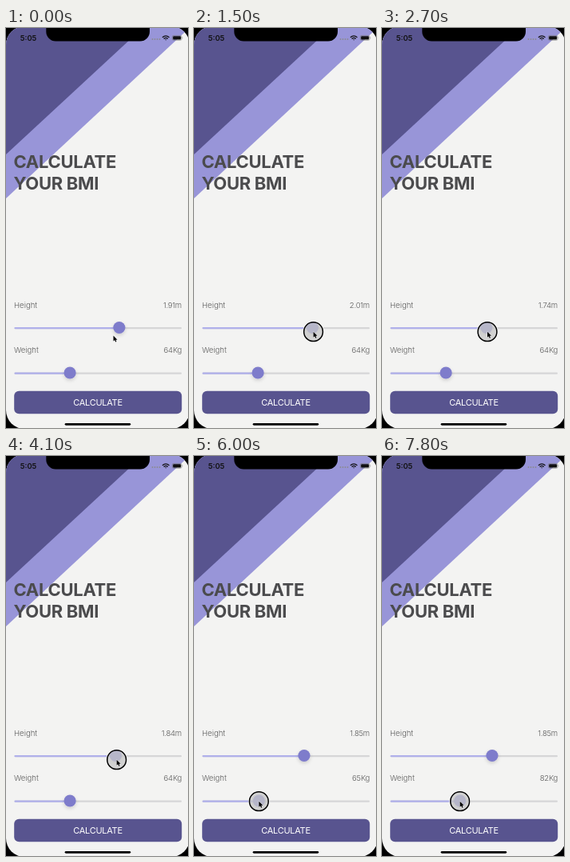
An HTML page for the animation above (8 s loop, 228 px wide and 500 px high).

```html
<!DOCTYPE html>
<html lang="en">
<head>
<meta charset="utf-8">
<title>BMI calculator</title>
<style>
  html, body { margin: 0; width: 100%; height: 100%; overflow: hidden; background: #000; }
  svg { display: block; width: 100vw; height: 100vh; }
  text { font-family: Inter, "Open Sans", sans-serif; }
  .title { font-size: 22px; font-weight: 700; letter-spacing: -.3px; fill: #4b4b4d; }
  .label { font-size: 9.6px; font-weight: 300; fill: #5c5c5c; }
  .value { text-anchor: end; letter-spacing: -.25px; }
  .button { font-size: 11px; letter-spacing: -.3px; fill: #fff; text-anchor: middle; }
  .clock { font-size: 9.3px; font-weight: 600; fill: #111; }
</style>
</head>
<body>
<svg viewBox="0 0 228 500">
  <defs>
    <clipPath id="screen"><rect y="-2" width="230" height="503" rx="23"/></clipPath>
    <filter id="shadow" x="-60%" y="-60%" width="220%" height="240%">
      <feDropShadow dx="0" dy="2" stdDeviation="2" flood-color="#000" flood-opacity=".16"/>
    </filter>
  </defs>
  <rect width="228" height="500"/>
  <g clip-path="url(#screen)">
    <rect width="228" height="500" fill="#f3f3f2"/>
    <path d="M0 0H229.500L0 213Z" fill="#9895d8"/>
    <path d="M0 0H171L0 158Z" fill="#58548f"/>
  </g>
  <path d="M50.300 0V4.500A12 12 0 0 0 62.300 16.500H168A12 12 0 0 0 180 4.500V0Z"/>

  <text class="clock" x="17.800" y="15.700">5:05</text>
  <path d="M183.500 14H193" stroke="#8b8b91" stroke-width="1.800" stroke-linecap="round" stroke-dasharray="0 3"/>
  <g fill="none" stroke="#111" stroke-width="1.300">
    <path d="M195.900 11.700Q200.200 8.200 204.500 11.700M197.600 13.400Q200.200 11.400 202.800 13.400"/>
    <path d="M199.100 14.300L200.200 15.500L201.300 14.300Z" fill="#111" stroke="none"/>
    <rect x="208.300" y="9.400" width="11.800" height="5.900" rx="1.700" stroke="#777" stroke-width=".6"/>
  </g>
  <rect x="209.200" y="10.300" width="10" height="4.100" rx="1" fill="#111"/>
  <path d="M220.800 11.300Q221.800 12.300 220.800 13.300Z" fill="#777"/>

  <text class="title" x="9.500" y="175">CALCULATE</text>
  <text class="title" x="9.500" y="202">YOUR BMI</text>

  <g id="sliders"></g>

  <rect x="10.200" y="453.800" width="210" height="28.500" rx="6" fill="#58548f"/>
  <text class="button" x="115" y="472">CALCULATE</text>
  <rect x="73.700" y="493.900" width="82.500" height="2.800" rx="1.400"/>

  <g id="pointer">
    <g id="ring">
      <circle r="13" fill="none" stroke="#fff"/>
      <circle r="11.900" fill="#c8c8c8" fill-opacity=".76" stroke="#000" stroke-width="1.500"/>
    </g>
    <path d="M0 0V7.800L1.800 6.200L3 9L4.400 8.400L3.200 5.700H5.600Z" transform="scale(.9)"
      stroke="#fff" stroke-width=".8" paint-order="stroke"/>
  </g>
</svg>
<script>
const LOOP = 8000, STEP = 100;
const $ = id => document.getElementById(id);

// Smooth progress from 0 to 1 between two times.
function ease(t, from, to) {
  const p = Math.min(1, Math.max(0, (t - from) / (to - from)));
  return p * p * (3 - 2 * p);
}

const mix = (a, b, p) => a.map((v, i) => v + (b[i] - v) * p);

const heightAt = t => 1.91 + .10 * ease(t, 700, 1500) - .27 * ease(t, 1600, 2700)
  + .09 * ease(t, 2700, 3300) + .02 * ease(t, 3300, 4700);

const weightAt = t => 64 + 8 * ease(t, 5900, 6300) + 6 * ease(t, 6500, 6700)
  + 4 * ease(t, 6700, 7800);

// The pointer grips the height thumb, pauses between the sliders, then grips the weight thumb.
function pointerAt(t, heightX, weightX) {
  let p = mix([134.5, 384.5], [heightX + 1.2, 379.7], ease(t, 200, 700));
  p = mix(p, [98, 425.5], ease(t, 4900, 5200));
  return mix(p, [weightX, 431.7], ease(t, 5200, 5800));
}

function makeSlider(name, y, max, format) {
  const g = document.createElementNS("http://www.w3.org/2000/svg", "g");
  g.innerHTML = `
    <text class="label" x="10" y="${y - 25.5}">${name}</text>
    <text class="label value" x="220" y="${y - 25.5}"></text>
    <rect x="10.5" y="${y - 1}" width="209.5" height="2.3" rx="1.1" fill="#d6d6d7"/>
    <rect class="fill" x="10.5" y="${y - 1}" height="2.3" rx="1.1" fill="#b0b0ea"/>
    <circle cy="${y - .5}" r="7.6" fill="#7e7bcb" filter="url(#shadow)"/>`;
  $("sliders").append(g);
  const value = g.querySelector(".value");
  const fill = g.querySelector(".fill");
  const thumb = g.querySelector("circle");
  return v => {
    const x = 17.7 + 195 * v / max;
    value.textContent = format(v);
    fill.setAttribute("width", x - 10.5);
    thumb.setAttribute("cx", x);
    return x;
  };
}

const setHeight = makeSlider("Height", 375, 3, v => v.toFixed(2) + "m");
const setWeight = makeSlider("Weight", 431.5, 200, v => Math.round(v) + "Kg");

function draw(time) {
  const t = Math.floor(time % LOOP / STEP) * STEP;
  const heightX = setHeight(heightAt(t));
  const weightX = setWeight(weightAt(t));
  const [x, y] = pointerAt(t, heightX, weightX);
  $("pointer").setAttribute("transform", `translate(${x} ${y})`);
  const pressed = t >= 700 && t < 5000 || t >= 5900;
  $("ring").setAttribute("visibility", pressed ? "visible" : "hidden");
}

const start = performance.now();
function tick() {
  draw(performance.now() - start);
  requestAnimationFrame(tick);
}
tick();
</script>
</body>
</html>
```
